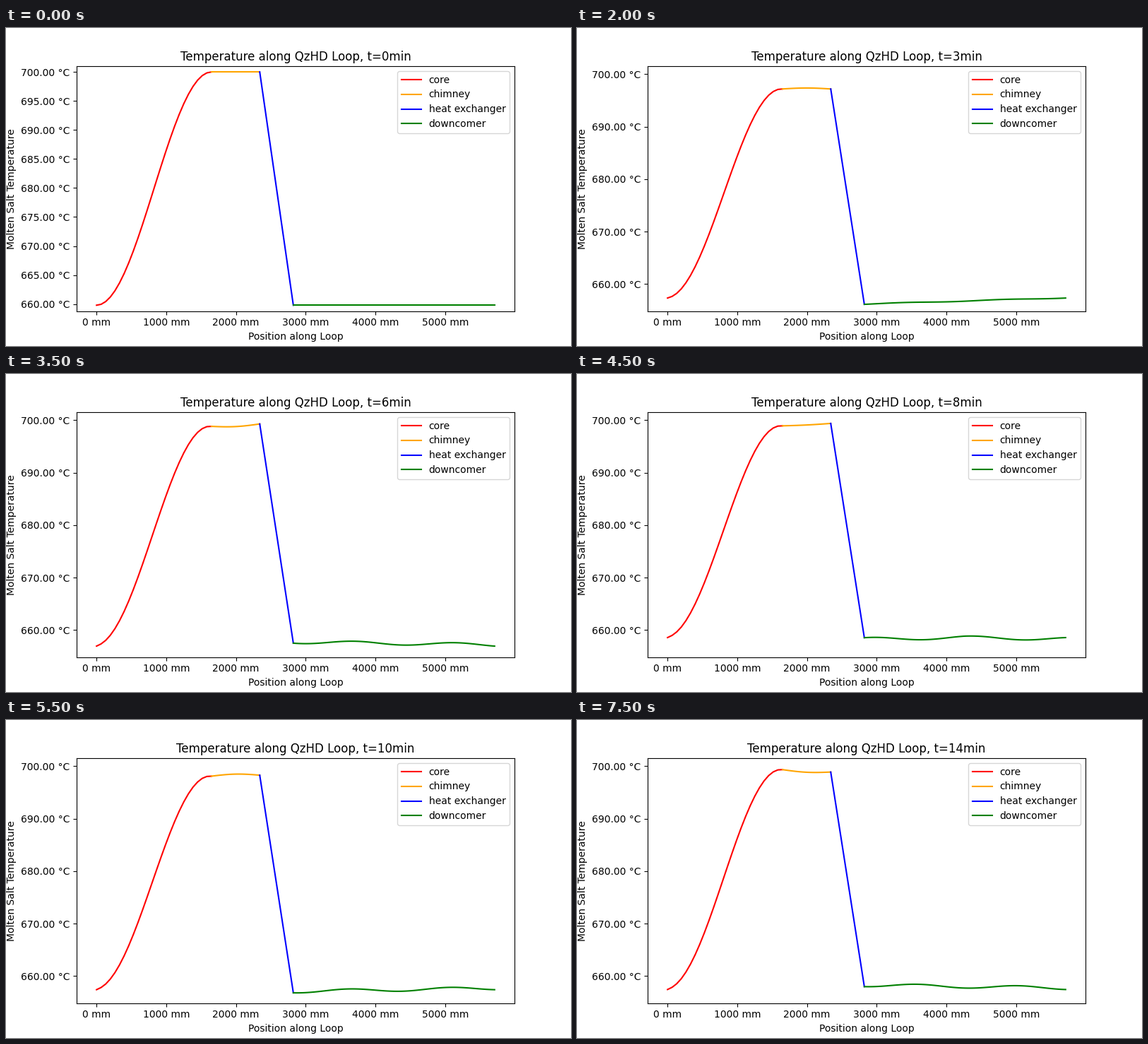
Animation, 800 px wide and 450 px high, one loop 8000 ms. Source, as a matplotlib script:

```python
import numpy as np
import matplotlib.pyplot as plt
from matplotlib.animation import FuncAnimation
from matplotlib.ticker import MultipleLocator

LOOP_END = 5710
SECTIONS = [
    ("core", "red", 0, 1648, 26),
    ("chimney", "orange", 1648, 2341, 30),
    ("heat exchanger", "blue", 2341, 2823, 2),
    ("downcomer", "green", 2823, LOOP_END, 120),
]
# Key points (minute, temperature) on either side of the heat exchanger
HOT = [(0, 700), (3, 697.2), (5, 699.25), (8, 699.4), (10, 698.3), (12, 698.05), (14, 698.9)]
COLD = [(0, 659.8), (3, 656.2), (4, 656.3), (5, 657.2), (7.5, 658.6),
        (10, 657.1), (12, 657.2), (14, 658.3)]


def wave(turns):
    return np.cos(2 * np.pi * turns)


def downcomer(minute, settle, u):
    # Salt further down left the exchanger up to a minute earlier
    trend = np.interp(minute - u, *zip(*COLD))
    crest = 0.04 + 0.37 * (minute - 8)
    return trend + 0.3 * settle**3 * wave(2 * (u - crest))


def chimney(minute, settle, u):
    climb = 0.5 * np.sin(2 * np.pi * (minute - 3) / 16)
    bow = 0.3 * wave((minute - 3) / 7)
    hot = np.interp(minute, *zip(*HOT))
    return hot + settle * (climb * (u - 1) + bow * np.sin(np.pi * u))


def core(inlet, outlet, settle, u):
    heating = (1 - np.cos(np.pi * u)) / 2
    return inlet + (outlet - inlet) * heating + 1.1 * settle * np.sin(np.pi * u**0.8)


def temperatures(minute):
    settle = min(minute / 5, 1)
    u_core, u_chimney, _, u_down = (np.linspace(0, 1, n) for *_, n in SECTIONS)
    up = chimney(minute, settle, u_chimney)
    down = downcomer(minute, settle, u_down)
    return core(down[-1], up[0], settle, u_core), up, [up[-1], down[0]], down


fig, ax = plt.subplots(figsize=(8, 4.5), dpi=100)
lines = [ax.plot(np.linspace(start, end, n), np.full(n, 680.0), color=color, label=name)[0]
         for name, color, start, end, n in SECTIONS]
margin = 0.05 * LOOP_END
ax.set_xlim(-margin, LOOP_END + margin)
ax.xaxis.set_major_locator(MultipleLocator(1000))
ax.xaxis.set_major_formatter("{x:.0f} mm")
ax.yaxis.set_major_formatter("{x:.2f} °C")
ax.set_xlabel("Position along Loop")
ax.set_ylabel("Molten Salt Temperature")
ax.legend(loc="upper right")


def update(frame):
    minute = max(0, frame - 1)  # the first minute is held for two steps
    for line, values in zip(lines, temperatures(minute)):
        line.set_ydata(values)
    low, high, step = (654.88, 701.545, 10) if minute else (658.8, 701, 5)
    ax.set_ylim(low, high)
    ax.yaxis.set_major_locator(MultipleLocator(step))
    ax.set_title(f"Temperature along QzHD Loop, t={minute}min")
    return lines


anim = FuncAnimation(fig, update, frames=16, interval=500, repeat=True, repeat_delay=0)
plt.show()
```
